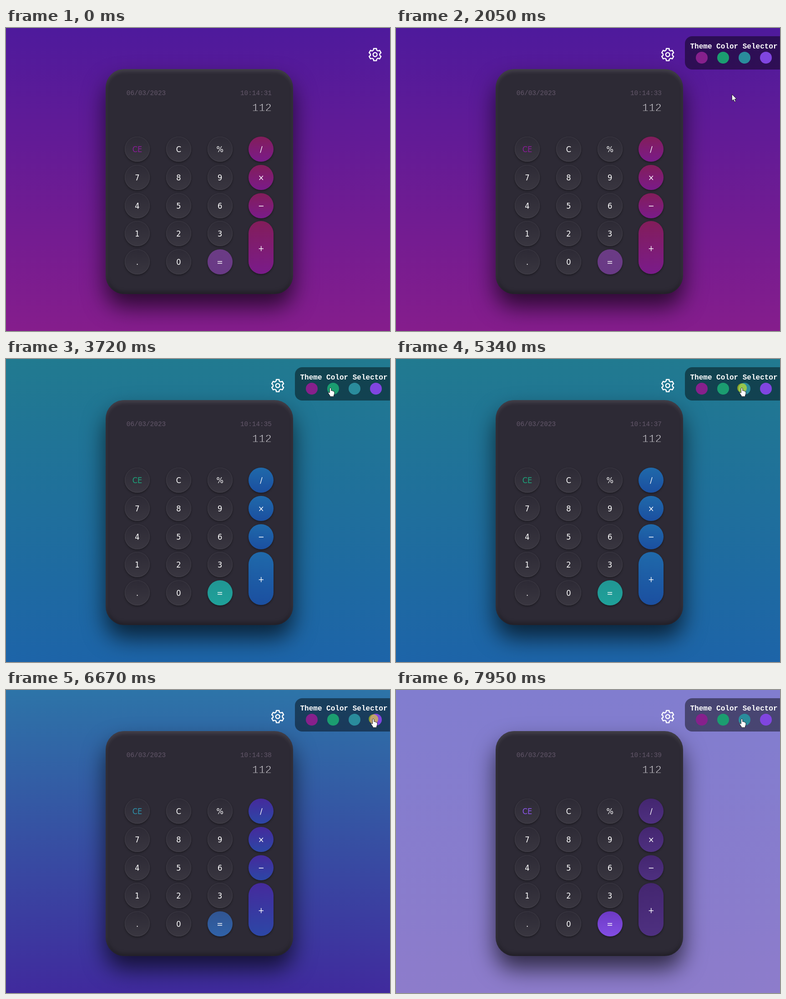
These frames come from a looping animation (844 by 664 pixels, 8000 ms). An HTML page:

```html
<!DOCTYPE html>
<html lang="en">
<head>
<meta charset="utf-8">
<title>Calculator themes</title>
<style>
html, body { margin: 0; width: 100%; height: 100%; overflow: hidden; }
.plum {
  --top: #4e1a9c; --bottom: #851d8c; --op1: #831d5a; --op2: #7a1b8a;
  --eq1: #6b3b85; --eq2: #693a86; --ce: #8a1c98;
}
.sea {
  --top: #217a90; --bottom: #1d64a8; --op1: #1f69aa; --op2: #1b4fa0;
  --eq1: #219693; --eq2: #1fa19a; --ce: #1da57c;
}
.dusk {
  --top: #2d74a8; --bottom: #402a9d; --op1: #452a9c; --op2: #2c47a6;
  --eq1: #315592; --eq2: #3062a8; --ce: #2d92ac;
}
.lilac {
  --top: #817dcf; --bottom: #8d7ccb; --op1: #442670; --op2: #4e3080;
  --eq1: #6d3ac4; --eq2: #824de3; --ce: #8c55eb;
}
#stage {
  position: relative; width: 844px; height: 664px; overflow: hidden;
  background: linear-gradient(var(--top), var(--bottom));
}
#stage * { position: absolute; white-space: nowrap; }
.card {
  left: 219px; top: 89.5px; width: 412px; height: 493.5px; border-radius: 41px;
  background: #2d2a35;
  box-shadow: 0 28px 50px rgba(0,0,0,.66),
    inset 0 5px 9px rgba(255,255,255,.12), inset 0 -5px 9px rgba(0,0,0,.28);
}
.mono { font-family: "Courier New", "Liberation Mono", monospace; }
.small { top: 133px; font-size: 14.4px; line-height: 20px; color: #63576a; }
.date { left: 264.8px; }
.time { right: 260px; }
/* A stroke in the card colour thins the digits */
.value {
  right: 260px; top: 163.6px; font-size: 24px; line-height: 24px;
  color: #dddbe0; -webkit-text-stroke: .8px #2d2a35;
}
.key {
  width: 55px; height: 55px; border-radius: 28px; color: #fff;
  font: condensed 18px/56px Tahoma, "DejaVu Sans Condensed", "DejaVu Sans", sans-serif;
  text-align: center;
  background: linear-gradient(#2d2a35, #393640);
  box-shadow: 0 2px 4px rgba(0,0,0,.42), inset 0 0 2px rgba(255,255,255,.2);
}
.ce { color: var(--ce); }
.op, .eq { box-shadow: 0 2px 4px rgba(0,0,0,.42); }
.op { background: linear-gradient(var(--op1), var(--op2)); }
.eq { background: linear-gradient(var(--eq1), var(--eq2)); }
.tall { height: 116px; line-height: 119px; }
#drawer { left: 0; top: 0; width: 844px; height: 664px; }
.panel {
  left: 849px; top: 18px; width: 230px; height: 73px;
  border-radius: 16px 0 0 16px; background: rgba(0,0,0,.45);
}
.title { left: 11.5px; top: 12.7px; font-size: 16px; font-weight: bold; line-height: 20px; color: #fff; }
.dot { top: 34px; width: 26px; height: 26px; border-radius: 50%; }
svg { left: 0; top: 0; overflow: visible; }
#click {
  width: 21px; height: 21px; margin: -10.5px; border-radius: 50%;
  background: rgba(255,255,0,.5);
}
#cursor path { fill: #fff; stroke: #15131c; stroke-width: .9; stroke-linejoin: round; }
</style>
</head>
<body>
<div id="stage" class="plum">
  <div class="card"></div>
  <div class="mono small date">06/03/2023</div>
  <div class="mono small time" id="clock">10:14:31</div>
  <div class="mono value">112</div>
  <div id="keys"></div>
  <div id="drawer">
    <svg width="1" height="1">
      <g transform="translate(811.2 58.3)" fill="none" stroke="#fff" stroke-width="2.4" stroke-linejoin="round">
        <g id="gear"></g><circle r="4.4"/>
      </g>
    </svg>
    <div class="panel" id="panel"><div class="mono title">Theme Color Selector</div></div>
  </div>
  <div id="click"></div>
  <svg id="cursor" width="1" height="1">
    <path id="arrow" d="M0 0V14.6L3.4 11.5 5.8 16.8 8.2 15.7 5.9 10.6H10.4Z"/>
    <path id="hand" d="M-1.7 1.6Q0-1.6 1.7 1.6V6.2Q3.6 5.2 4.3 6.9 6 6.1 6.7 7.8 8.9 7.4 8.9 9.6V13L7.5 16.5V19H-.9V17.4L-4.9 11.4Q-4.6 8.6-1.7 11Z"/>
  </svg>
</div>
<script>
const $ = id => document.getElementById(id);
const LOOP = 8000, SLIDE = 214;
const GEAR = { x: 811.5, y: 58.5 };
const dot = i => ({ x: 671.6 + 47.1 * i, y: 65 });
const onDot = i => ({ x: dot(i).x - 5.7, y: dot(i).y - 1.8 });

function add(parent, cls, css, text = '') {
  const el = document.createElement('div');
  el.className = cls;
  el.style.cssText = css;
  el.textContent = text;
  parent.append(el);
}

const KINDS = { CE: ' ce', '=': ' eq', '/': ' op', '×': ' op', '−': ' op', '+': ' op tall' };
['CE C % /', '7 8 9 ×', '4 5 6 −', '1 2 3 +', '. 0 ='].forEach((row, r) =>
  row.split(' ').forEach((label, c) =>
    add($('keys'), 'key' + (KINDS[label] || ''),
      `left:${261 + c * 90.8}px;top:${238 + r * 61.75}px`, label)));

['#86208c', '#1b9d70', '#2a8c9c', '#8045e0'].forEach((color, i) =>
  add($('panel'), 'dot', `left:${dot(i).x - 648}px;background:${color}`));

// One tooth and the rim to the next, turned six times
for (let a = 0; a < 360; a += 60)
  $('gear').innerHTML +=
    `<path d="M-3.5-9.8L-3.1-13.3H3.1L3.5-9.8L6.7-7.9" transform="rotate(${a})"/>`;

// Pointer trips; a press ends by switching to the theme, if any
const HOME = { x: 692, y: 604 };
const TRIPS = [
  { from: 390, to: 1150, goal: { x: 812.5, y: 53.5 }, press: [1550, 1700] },
  { from: 1700, to: 2240, goal: { x: 728, y: 152 }, sag: 14 },
  { from: 2450, to: 3510, goal: onDot(1), press: [3650, 3720], theme: 'sea' },
  { from: 3740, to: 4120, goal: { x: 655, y: 275 } },
  { from: 4120, to: 5200, goal: onDot(2), press: [5340, 5460], theme: 'dusk' },
  { from: 5460, to: 6390, goal: onDot(3), sag: 80, press: [6670, 6800], theme: 'lilac' },
  { from: 7080, to: 7540, goal: onDot(2) }
];

const clamp = u => Math.min(1, Math.max(0, u));
const easeOut = u => 1 - (1 - u) ** 2;
const smooth = u => u * u * (3 - 2 * u);

function pointer(t) {
  let { x, y } = HOME;
  for (const { from, to, goal, sag = 0 } of TRIPS) {
    const e = easeOut(clamp((t - from) / (to - from)));
    x += (goal.x - x) * e;
    y += (goal.y - y) * e + sag * Math.sin(Math.PI * e);
  }
  return { x, y };
}

function show(id, on) { $(id).style.display = on ? '' : 'none'; }

function render(t) {
  let theme = 'plum', pressed = false;
  for (const trip of TRIPS) {
    if (!trip.press) continue;
    const [down, up] = trip.press;
    pressed ||= t >= down && t < up;
    if (trip.theme && t >= up) theme = trip.theme;
  }
  $('stage').className = theme;
  $('clock').textContent = '10:14:' + (32 + Math.floor((t - 130) / 1000));

  const open = smooth(clamp((t - 1640) / 390)), shift = SLIDE * open;
  $('drawer').style.transform = `translateX(${-shift}px)`;

  const p = pointer(t);
  const near = (q, r) => Math.hypot(p.x - q.x, p.y - q.y) < r;
  const over = near({ x: GEAR.x - shift, y: GEAR.y }, 16)
    || open === 1 && [0, 1, 2, 3].some(i => near(dot(i), 13));
  $('cursor').style.transform = $('click').style.transform = `translate(${p.x}px,${p.y}px)`;
  show('cursor', t >= TRIPS[0].from);
  show('hand', over);
  show('arrow', !over);
  show('click', pressed);
}

const start = performance.now();
function tick() {
  render((performance.now() - start) % LOOP);
  requestAnimationFrame(tick);
}
tick();
</script>
</body>
</html>
```
